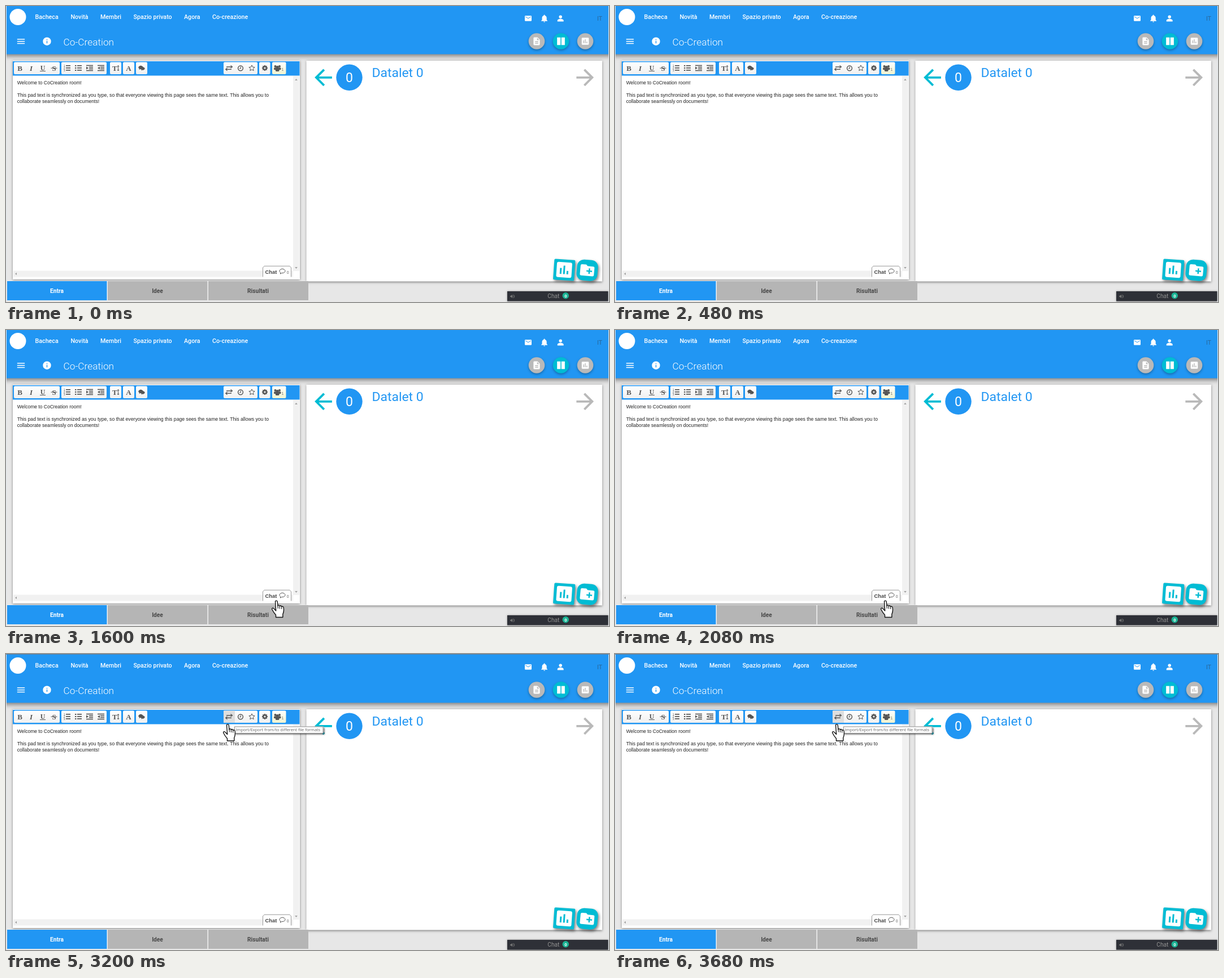
Write an HTML page with a canvas that moves like this. It is 1067 by 525 pixels and loops after 4000 ms.

```html
<!DOCTYPE html>
<html lang="it">
<head>
<meta charset="utf-8">
<title>Co-Creation room</title>
<style>
html, body { margin: 0; width: 100%; height: 100%; overflow: hidden; background: #e7e7e7; }
canvas { display: block; }
</style>
</head>
<body>
<canvas id="stage" width="1067" height="525"></canvas>
<script>
const g = document.getElementById('stage').getContext('2d');
const BLUE = '#2196f3', TEAL = '#00bcd4', GRAY = '#b5b5b5', INK = '#555';
const ROBOTO = 'Roboto, sans-serif', ARIAL = '"Liberation Sans", Arial, sans-serif';
const SERIF = '"Liberation Serif", serif', TIP = '"Open Sans", sans-serif';

// 24-unit icon outlines
const ICONS = {
  menu: 'M3 18h18v-2H3zM3 13h18v-2H3zM3 6v2h18V6z',
  info: 'M12 2a10 10 0 1 0 0 20a10 10 0 1 0 0-20zM13 17h-2v-6h2zM13 9h-2V7h2z',
  mail: 'M20 4H4a2 2 0 0 0-2 2v12a2 2 0 0 0 2 2h16a2 2 0 0 0 2-2V6a2 2 0 0 0-2-2zM20 8l-8 5-8-5V6l8 5 8-5z',
  bell: 'M12 22a2 2 0 0 0 2-2h-4a2 2 0 0 0 2 2zM18 16v-5c0-3-1.600-5.600-4.500-6.300V4a1.500 1.500 0 0 0-3 0v.7C7.600 5.400 6 8 6 11v5l-2 2v1h16v-1z',
  person: 'M12 12a4 4 0 1 0 0-8a4 4 0 1 0 0 8zM12 13c-3 0-8 1.500-8 4.500V20h16v-2.500c0-3-5-4.500-8-4.500z',
  page: 'M14 2H6a2 2 0 0 0-2 2v16a2 2 0 0 0 2 2h12a2 2 0 0 0 2-2V8zM16 18H8v-2h8zM16 14H8v-2h8zM13 9V3.500L18.500 9z',
  pause: 'M3 3h8v18H3zM13 3h8v18h-8z',
  chart: 'M19 3H5a2 2 0 0 0-2 2v14a2 2 0 0 0 2 2h14a2 2 0 0 0 2-2V5a2 2 0 0 0-2-2zM9 17H7v-7h2zM13 17h-2V7h2zM17 17h-2v-4h2z',
  folder: 'M20 6h-8l-2-2H4a2 2 0 0 0-2 2v12a2 2 0 0 0 2 2h16a2 2 0 0 0 2-2V8a2 2 0 0 0-2-2zM19 14h-3v3h-2v-3h-3v-2h3V9h2v3h3z',
  back: 'M20 11H7.830l5.590-5.590L12 4l-8 8 8 8 1.410-1.410L7.830 13H20z',
  sound: 'M3 9v6h4l5 5V4L7 9zM14 8v8c3-2 3-6 0-8zM15 4v2c6 3 6 9 0 12v2c9-3 9-13 0-16z'
};
for (const k in ICONS) ICONS[k] = new Path2D(ICONS[k]);
const HAND = new Path2D('M6.500 2.500C6.500 0 10 0 10.300 2.500L11 10C11.500 8 14 8.200 14.300 10.500C15 8.800 17.500 9.300 17.700 11.500C18.500 10 21 10.800 21.200 13C21.800 17 21.500 21 19.800 24.500V30H7.500V26C4 22 2 18.500.8 16C0 13.500 2.800 12.800 4.300 15L7.700 18.500z');

function rect(x, y, w, h, color) {
  g.fillStyle = color;
  g.fillRect(x, y, w, h);
}
function round(x, y, w, h, r, color) {
  g.fillStyle = color;
  g.beginPath();
  g.roundRect(x, y, w, h, r);
  g.fill();
}
function disc(x, y, r, color) {
  g.fillStyle = color;
  g.beginPath();
  g.arc(x, y, r, 0, 7);
  g.fill();
}
function line(color, width, ...pts) {
  g.strokeStyle = color;
  g.lineWidth = width;
  g.beginPath();
  for (let i = 0; i < pts.length; i += 2) g.lineTo(pts[i], pts[i + 1]);
  g.stroke();
}
function text(s, x, y, font, color, align = 'left') {
  g.font = font;
  g.fillStyle = color;
  g.textAlign = align;
  g.fillText(s, x, y);
}
function shadow(blur, dx, dy, alpha, paint) {
  g.save();
  g.shadowColor = `rgba(0,0,0,${alpha})`;
  g.shadowBlur = blur;
  g.shadowOffsetX = dx;
  g.shadowOffsetY = dy;
  paint();
  g.restore();
}
function icon(name, x, y, scale, color, angle = 0, flip = 1) {
  g.save();
  g.translate(x, y);
  g.rotate(angle);
  g.scale(scale * flip, scale);
  g.translate(-12, -12);
  g.fillStyle = color;
  g.fill(ICONS[name], 'evenodd');
  g.restore();
}

function header(s) {
  shadow(8, 0, 3, .45, () => rect(-10, -10, 1090, 95.5, BLUE));
  disc(21, 19.5, 14.5, '#fff');
  s.menu.forEach(([label, x]) => text(label, x, 23, '500 10.700px ' + ROBOTO, '#fff'));
  ['mail', 'bell', 'person'].forEach((n, i) =>
    icon(n, 924 + i * 28.6 + s.iconShift, 22, i ? .68 : .6, '#fff'));
  text(s.lang, 1050.5, 26, '10.500px ' + ROBOTO, '#2a6799', 'center');
  icon('menu', 26.5, 62.7, .74, '#fff');
  icon('info', 72.5, 62.7, .72, '#fff');
  text('Co-Creation', 101.5, 70, '300 17.300px ' + ROBOTO, '#fff');
  ['page', 'pause', 'chart'].forEach((n, i) => {
    const x = 939 + i * 43;
    shadow(4, 0, 2, .3, () => disc(x, 62.5, 14.3, i === 1 ? TEAL : '#b9b9b9'));
    icon(n, x, 62.5, i === 1 ? .76 : .7, '#fff');
  });
}

function listIcon(x, kind) {
  for (let i = 0; i < 4; i++) {
    const y = 105.5 + i * 3;
    const inset = kind > 1 && (i === 1 || i === 2) ? 5 : 0;
    if (kind < 2 && i < 3) {
      const ly = 106 + i * 4;
      rect(x - 2, ly - 1, 8, 1.7, INK);
      if (kind) rect(x - 6, ly - 1, 2.4, 2, INK);
      else text(i + 1, x - 6, ly + 1.8, '4.500px ' + ARIAL, INK);
    } else if (kind > 1) rect(x - 6 + inset, y - .8, 12 - inset, 1.6, INK);
  }
  if (kind > 1) {
    const d = kind === 2 ? 1 : -1;
    g.beginPath();
    g.moveTo(x - 4 - 2 * d, 107.5);
    g.lineTo(x - 4 + 2 * d, 110);
    g.lineTo(x - 4 - 2 * d, 112.5);
    g.fill();
  }
}

function bubble(x, y, rx, ry, fill) {
  g.beginPath();
  g.ellipse(x, y, rx, ry, 0, 2.3, 8.1);
  g.lineTo(x - rx * .7, y + ry * 1.4);
  g.closePath();
  if (fill) g.fill(); else g.stroke();
}

function toolbar(s) {
  rect(12, 98, 507.5, 25.5, BLUE);
  [[14, 81], [98, 80], [184, 20], [207, 20], [230, 20], [385, 60], [448, 19.5], [471, 24.5]].forEach(([x, w], i) => {
    const fill = g.createLinearGradient(0, 99, 0, 121);
    fill.addColorStop(0, '#fff');
    fill.addColorStop(1, i === 7 ? '#f0f3cf' : '#f0f0f0');
    round(x, 99.5, w, 21.5, 2, fill);
  });
  if (s.hot) rect(s.hot - 10, 99.5, 20, 21.5, '#dedede');
  text('B', 24.5, 114.5, 'bold 13px ' + SERIF, INK, 'center');
  text('I', 44.5, 114.5, 'italic bold 13px ' + SERIF, INK, 'center');
  text('U', 65, 113.5, 'bold 12px ' + SERIF, INK, 'center');
  rect(60, 115, 10, 1, INK);
  text('S', 85, 114.5, 'bold 13px ' + SERIF, INK, 'center');
  rect(79.5, 109.7, 11, 1, INK);
  [108, 128, 148, 168].forEach(listIcon);
  text('T', 188, 114.5, 'bold 13px ' + SERIF, INK);
  line(INK, 1, 198.5, 106, 198.5, 115);
  line(INK, 1, 196.8, 107.5, 198.5, 105.5, 200.2, 107.5);
  line(INK, 1, 196.8, 113, 198.5, 115, 200.2, 113);
  text('A', 217, 114.5, 'bold 13px ' + SERIF, INK, 'center');
  bubble(238.5, 109, 4, 3, true);
  bubble(242, 111, 3.5, 2.7, true);

  // import/export, history, star, settings, users
  line(INK, 1.5, 390, 108, 400, 108);
  line(INK, 1.5, 389, 112.3, 399, 112.3);
  line(INK, 1.2, 397.5, 105.5, 400.5, 108, 397.5, 110);
  line(INK, 1.2, 391.5, 110, 388.7, 112.3, 391.5, 114.7);
  g.lineWidth = 1.5;
  g.beginPath();
  g.arc(415, 110.3, 4.4, 0, 7);
  g.stroke();
  line(INK, 1.1, 415.3, 107.5, 415.3, 110.8, 413, 110.8);
  g.beginPath();
  for (let i = 0; i < 10; i++) {
    const a = i * Math.PI / 5 - Math.PI / 2, r = i % 2 ? 2.5 : 5.4;
    g.lineTo(435 + r * Math.cos(a), 110.3 + r * Math.sin(a));
  }
  g.closePath();
  g.lineWidth = 1;
  g.stroke();
  for (let i = 0; i < 4; i++) {
    const a = i * Math.PI / 4, c = 5 * Math.cos(a), d = 5 * Math.sin(a);
    line(INK, 2, 458 - c, 110 - d, 458 + c, 110 + d);
  }
  disc(458, 110, 3.8, INK);
  disc(458, 110, 1.6, '#f6f6f6');
  [[476.5, 107], [484, 107], [480.2, 108.5]].forEach(([x, y], i) => {
    const k = i === 2 ? 1.3 : 1;
    disc(x, y, 2 * k, INK);
    round(x - 2.5 * k, y + 2.2, 5 * k, 4 * k, 1.5, INK);
  });
  text('1', 487.5, 114.5, '7px ' + ARIAL, '#777');
}

function caret(x, y, dx, dy) {
  g.fillStyle = '#a0a0a0';
  g.beginPath();
  g.moveTo(x + dx * 2, y + dy * 2);
  g.lineTo(x - dx - dy * 2.3, y - dy - dx * 2.3);
  g.lineTo(x - dx + dy * 2.3, y - dy + dx * 2.3);
  g.fill();
}

function editor(s) {
  shadow(4, 0, 1, .45, () => rect(12, 97, 508, 388, '#fff'));
  toolbar(s);
  rect(508, 124, 11, 346, '#f1f1f1');
  rect(13, 469.5, 495, 11, '#f1f1f1');
  caret(513.5, 131, 0, -1);
  caret(513.5, 464, 0, 1);
  caret(18, 475, -1, 0);
  text('Welcome to CoCreation room!', 19.7, 139, '8.500px ' + ARIAL, '#222');
  text('This pad text is synchronized as you type, so that everyone viewing this page sees the same text. This allows you to',
    19.7, 161.3, '8.680px ' + ARIAL, '#222');
  text('collaborate seamlessly on documents!', 19.7, 172.3, '8.580px ' + ARIAL, '#222');
  round(454, 461, 51, 20, [4, 4, 0, 0], '#fff');
  line('#999', 1, 454.5, 480.5, 454.5, 464, 457, 461.3, 502, 461.3, 504.5, 464, 504.5, 480.5);
  text('Chat', 458.5, 475.2, 'bold 9.400px ' + ARIAL, '#444');
  g.strokeStyle = INK;
  g.lineWidth = 1;
  bubble(489, 470, 5, 3.7);
  text('0', 496.7, 474.7, '7px ' + ARIAL, '#666');
}

function tile(x, y, r, angle, name, scale) {
  shadow(5, 2, 3, .5, () => {
    g.translate(x, y);
    g.rotate(angle);
    round(-18.5, -18.5, 37, 37, r, TEAL);
  });
  icon(name, x, y, scale, '#fff', angle);
}

function viewer() {
  shadow(4, 0, 1, .45, () => rect(531.5, 97, 523.5, 391.5, '#fff'));
  icon('back', 561.5, 126.8, 1.92, TEAL);
  icon('back', 1024.7, 126.8, 1.92, '#b9b9b9', 0, -1);
  disc(607.5, 126.8, 23.2, BLUE);
  text('0', 607.5, 134.8, '23px ' + ROBOTO, '#fff', 'center');
  text('Datalet 0', 647.5, 125.6, '22.900px ' + ROBOTO, BLUE);
  tile(987.7, 468, 2, .07, 'chart', 1.5);
  tile(1028.5, 468.7, 12, .09, 'folder', 1.24);
}

function footer(s) {
  rect(2, 487.5, 533, 35, '#f2f2f2');
  s.tabs.forEach((label, i) => {
    rect(2 + i * 178, 488, i === 2 ? 177 : 176.5, 34, i ? GRAY : BLUE);
    text(label, 90 + i * 178, 509, 'bold 10.200px ' + ROBOTO, i ? '#484848' : '#fff', 'center');
  });
  shadow(3, 0, 0, .4, () => rect(887, 506, 178.5, 17.5, '#2e3037'));
  icon('sound', 896, 515, .42, '#777');
  text('Chat', 958.3, 517.5, '10.200px ' + ROBOTO, '#929292');
  disc(990.3, 513.7, 5.7, '#1ab394');
  text('0', 990.3, 516.5, 'bold 7.500px ' + ROBOTO, '#fff', 'center');
}

function tooltip(label, x, y, w) {
  shadow(2, 2, 2, .45, () => rect(x, y, w, 12.5, '#fff'));
  g.strokeStyle = '#8a8a8a';
  g.lineWidth = 1;
  g.strokeRect(x + .5, y + .5, w - 1, 11.5);
  text(label, x + 2.5, y + 8.8, '7.360px ' + TIP, '#666');
}

function cursor(x, y) {
  g.save();
  g.translate(x, y);
  g.fillStyle = '#fff';
  g.strokeStyle = '#111';
  g.lineWidth = 1.4;
  g.lineJoin = 'round';
  g.fill(HAND);
  g.stroke(HAND);
  line('#111', 1.1, 11, 9, 11.3, 14.5);
  line('#111', 1.1, 14.3, 10.5, 14.5, 15);
  line('#111', 1.1, 17.7, 11.5, 17.7, 15.5);
  g.restore();
}

const italian = {
  menu: [['Bacheca', 51.5], ['Novità', 114.5], ['Membri', 167], ['Spazio privato', 225.5], ['Agora', 315], ['Co-creazione', 365]],
  tabs: ['Entra', 'Idee', 'Risultati'], lang: 'IT', iconShift: 0, zoom: 1, dx: 0, dy: 0
};
const english = {
  menu: [['Open wall', 52], ['What\'s new', 120], ['Members', 196.5], ['My space', 263.3], ['Agora', 331], ['Cocreation', 380.5]],
  tabs: ['Explore', 'Ideas', 'Outcome'], lang: 'EN', iconShift: -4.6, zoom: 1.0035, dx: -1.4, dy: 1.4
};
const STEP = 800;
const scenes = [
  italian,
  { ...italian, hand: [82, 185] },
  { ...italian, hand: [470, 479.5] },
  { ...english, hand: [404.5, 119.5], hot: 415, tip: ['Timeslider', 424.5, 133.5, 42], topLine: true },
  { ...italian, dy: 1, hand: [384, 124], hot: 395, tip: ['Import/Export from/to different file formats', 404, 128.5, 157.5], topLine: true }
];

function draw(s) {
  g.setTransform(1, 0, 0, 1, 0, 0);
  rect(0, 0, 1067, 525, '#e7e7e7');
  g.setTransform(s.zoom, 0, 0, s.zoom, s.dx, s.dy);
  header(s);
  editor(s);
  viewer();
  footer(s);
  g.setTransform(1, 0, 0, 1, 0, 0);
  rect(0, 0, 1, 525, '#e4e8ec');
  rect(1066, 0, 1, 525, '#e4e8ec');
  if (s.topLine) rect(0, 0, 1067, 1, '#5c7f9c');
  if (s.tip) tooltip(...s.tip);
  if (s.hand) cursor(...s.hand);
}

const start = performance.now();
function tick() {
  const t = performance.now() - start;
  draw(scenes[Math.floor(t / STEP) % scenes.length]);
  requestAnimationFrame(tick);
}
tick();
</script>
</body>
</html>
```
